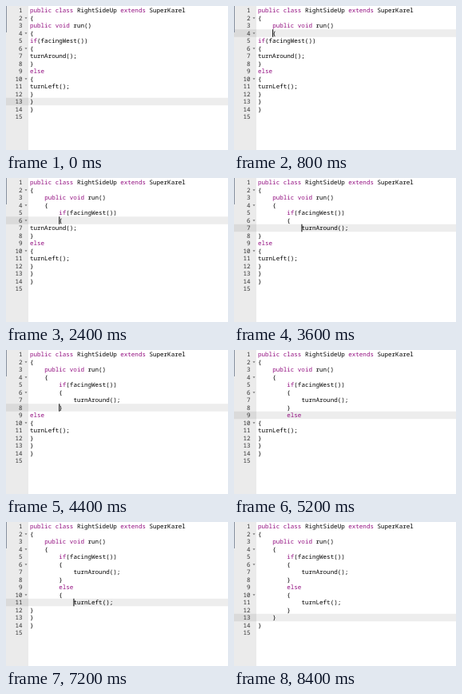
Recreate the animation shown at these times as an HTML page. Size 278x180 px, loop 8.8 s.

```html
<!DOCTYPE html>
<html lang="en">
<head>
<meta charset="utf-8">
<style>
html, body { margin: 0; width: 100%; height: 100%; overflow: hidden; background: #fff; }
svg { display: block; width: 278px; height: 180px; }
text {
  font: 7.56px "Noto Sans Mono", "DejaVu Sans Mono", monospace;
  text-rendering: geometricPrecision;
  white-space: pre;
}
.num { fill: #333; text-anchor: end; }
.key { fill: #930f80; }
</style>
</head>
<body>
<svg id="stage" viewBox="0 0 278 180">
  <rect width="278" height="180" fill="#fff"/>
  <rect width="28" height="180" fill="#ebebeb"/>
  <rect id="row" x="28" width="250" height="9.5" fill="#ededed"/>
  <rect id="gutterRow" width="28" height="9.5" fill="#dadada"/>
  <rect width="1" height="33" fill="#8790a0"/>
</svg>
<script>
const STEP = 400, LINE = 9.5, CHAR = 4.536, LEFT = 30, TOP = 0.75;
const source = [
  'public class RightSideUp extends SuperKarel', '{', 'public void run()', '{',
  'if(facingWest())', '{', 'turnAround();', '}', 'else', '{', 'turnLeft();', '}', '}', '}', ''
];
// Tabs each line receives, one key press per step
const tabs = [0, 0, 1, 1, 2, 2, 3, 2, 2, 2, 3, 2, 1, 0, 0];
const presses = tabs.flatMap((n, line) => Array(n).fill(line));
const FRAMES = presses.length + 1;
const caretOff = [0, 13, 21];

const stage = document.getElementById('stage');
const row = document.getElementById('row');
const gutterRow = document.getElementById('gutterRow');

function add(name, attrs, parent = stage) {
  const el = document.createElementNS('http://www.w3.org/2000/svg', name);
  for (const key in attrs) el.setAttribute(key, attrs[key]);
  parent.append(el);
  return el;
}

const lines = source.map((code, i) => {
  const y = TOP + i * LINE + 7.4;
  add('text', { class: 'num', x: 20.5, y }).textContent = i + 1;
  if (code === '{') add('path', { d: `M23.5 ${y - 3.4}h3l-1.5 2z`, fill: '#777' });
  const text = add('text', { x: LEFT, y });
  for (const part of code.split(/\b(public|class|extends|void|if|else)\b/)) {
    if (!part) continue;
    const isKey = /^(public|class|extends|void|if|else)$/.test(part);
    add('tspan', isKey ? { class: 'key' } : {}, text).textContent = part;
  }
  return text;
});
const caret = add('rect', { width: 1, height: LINE, fill: '#000' });

let shown = -1;
function draw(now) {
  const frame = Math.floor(now / STEP) % FRAMES;
  if (frame !== shown) {
    shown = frame;
    const done = presses.slice(0, frame);
    const active = frame ? presses[frame - 1] : 12;
    const indent = line => LEFT + done.filter(n => n === line).length * 4 * CHAR;
    lines.forEach((text, i) => text.setAttribute('x', indent(i)));
    const y = TOP + active * LINE;
    for (const el of [row, gutterRow, caret]) el.setAttribute('y', y);
    caret.setAttribute('x', indent(active));
    caret.setAttribute('visibility', caretOff.includes(frame) ? 'hidden' : 'visible');
  }
  requestAnimationFrame(draw);
}
draw(performance.now());
</script>
</body>
</html>
```
